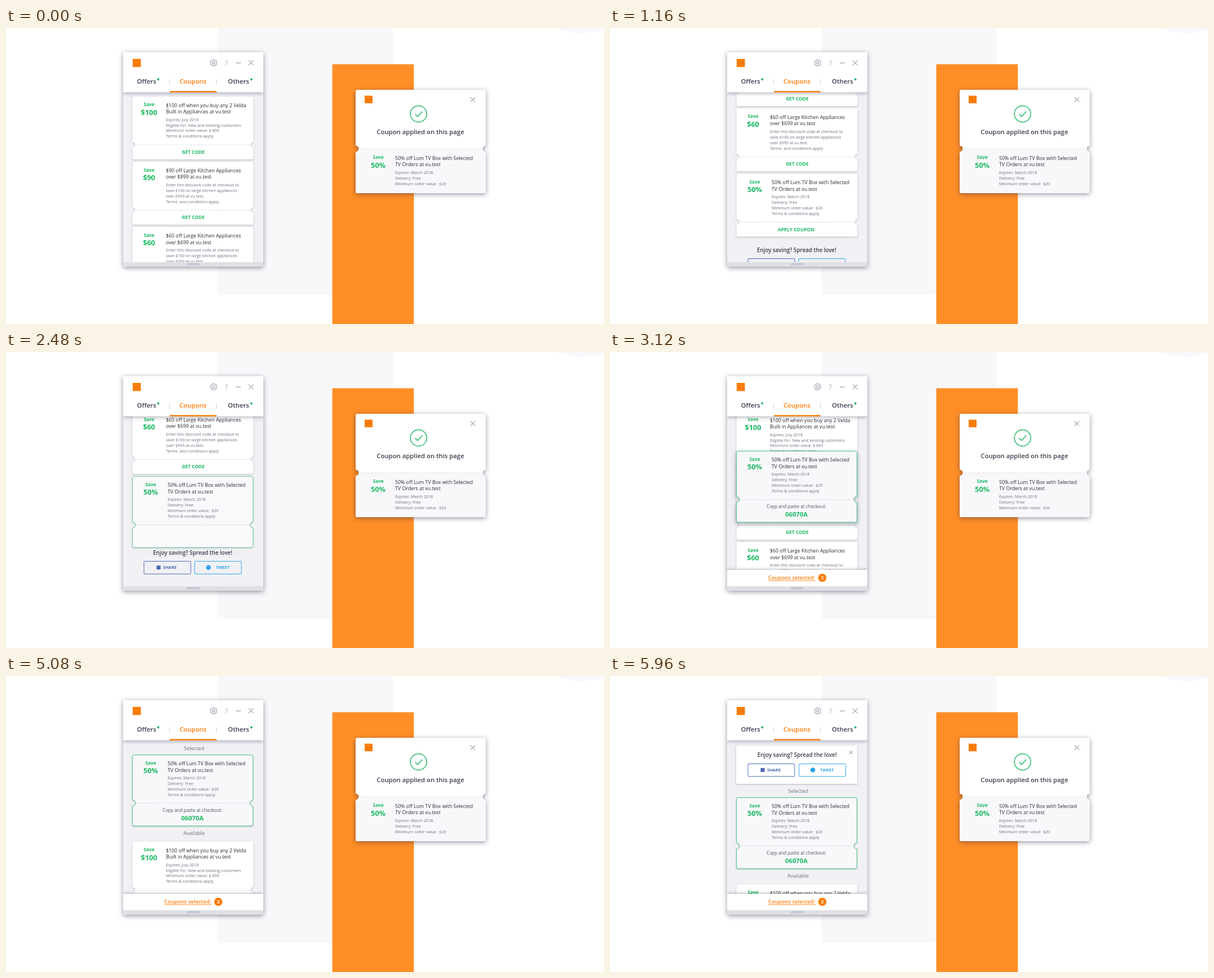
Animation of 1062 by 527 pixels, one loop 8040 ms. Source, as an HTML page with a canvas:

```html
<!DOCTYPE html>
<html lang="en">
<head>
<meta charset="utf-8">
<title>Coupon panel</title>
<style>
  html, body { margin: 0; width: 100%; height: 100%; overflow: hidden; background: #fff; }
  canvas { display: block; width: 1062px; height: 527px; }
</style>
</head>
<body>
<canvas id="stage"></canvas>
<script>
const W = 1062, H = 527, LOOP = 8040, STEP = 40;
const canvas = document.getElementById('stage');
const ctx = canvas.getContext('2d');
const dpr = window.devicePixelRatio || 1;
canvas.width = W * dpr;
canvas.height = H * dpr;

const GREEN = '#1cba63', ORANGE = '#f97c08', INK = '#3a3c4c', TITLE = '#2a2b35',
      MUTED = '#6c6f80', ICON = '#b3b4c0', LIST = '#f1f1f5', TINT = '#f8f8fb';
const CARD_X = 224.5, CARD_W = 215, CARD_H = 112, NOTCH = 86, PITCH = 116.3, LIST_TOP = 122;
const SCROLL = 249.3, RETURN = 422, CARD_RISE = 81.4, PANEL_DROP = 76.3;

const coupons = [
  { save: '$100', title: ['$100 off when you buy any 2 Velda', 'Built in Appliances at vu.test'],
    info: ['Expires; July 2018', 'Eligible for: New and existing customers', 'Minimum order value: $ 800', 'Terms & conditions apply'] },
  { save: '$90', title: ['$90 off Large Kitchen Appliances', 'over $899 at vu.test'],
    info: ['Enter this discount code at checkout to', 'save £100 on large kitchen appliances', 'over £999 at vu.test.', 'Terms  and conditions apply'] },
  { save: '$60', title: ['$60 off Large Kitchen Appliances', 'over $699 at vu.test'],
    info: ['Enter this discount code at checkout to', 'save $100 on large kitchen appliances', 'over $999 at vu.test.', 'Terms  and conditions apply'] }
];
const tvCoupon = { save: '50%', title: ['50% off Lum TV Box with Selected', 'TV Orders at vu.test'],
  info: ['Expires: March 2018', 'Delivery: Free', 'Minimum order value:  $20', 'Terms & conditions apply'] };

const ramp = (t, a, b) => Math.min(1, Math.max(0, (t - a) / (b - a)));
const ease = (t, a, b) => {
  const p = ramp(t, a, b);
  return p < 0.5 ? 2 * p * p : 1 - 2 * (1 - p) * (1 - p);
};

function rect(x, y, w, h, color) {
  ctx.fillStyle = color;
  ctx.fillRect(x, y, w, h);
}

function disc(x, y, r, color) {
  ctx.fillStyle = color;
  ctx.beginPath();
  ctx.arc(x, y, r, 0, Math.PI * 2);
  ctx.fill();
}

// y is the middle of the capital letters
function text(str, x, y, size, color, weight = 400, align = 'left') {
  ctx.font = `${weight} ${size}px "Open Sans", sans-serif`;
  ctx.fillStyle = color;
  ctx.textAlign = align;
  ctx.fillText(str, x, y + size * 0.35);
}

function line(color, width, ...points) {
  ctx.strokeStyle = color;
  ctx.lineWidth = width;
  ctx.beginPath();
  points.forEach(([x, y]) => ctx.lineTo(x, y));
  ctx.stroke();
}

function cross(x, y, r) {
  line(ICON, 1.5, [x - r, y - r], [x + r, y + r]);
  line(ICON, 1.5, [x - r, y + r], [x + r, y - r]);
}

function withAlpha(alpha, draw) {
  if (alpha <= 0) return;
  ctx.save();
  ctx.globalAlpha *= alpha;
  draw();
  ctx.restore();
}

function withShadow(color, blur, dy, draw) {
  ctx.save();
  ctx.shadowColor = color;
  ctx.shadowBlur = blur * dpr;
  ctx.shadowOffsetY = dy * dpr;
  draw();
  ctx.restore();
}

function box(x, y, w, h, r) {
  ctx.beginPath();
  ctx.roundRect(x, y, w, h, r);
}

function ticketPath(x, y, w, h, notchY, r) {
  const c = 3, q = Math.PI / 2;
  ctx.beginPath();
  ctx.moveTo(x + c, y);
  ctx.arcTo(x + w, y, x + w, y + c, c);
  ctx.arc(x + w, y + notchY, r, -q, q, true);
  ctx.arcTo(x + w, y + h, x + w - c, y + h, c);
  ctx.arcTo(x, y + h, x, y + h - c, c);
  ctx.arc(x, y + notchY, r, q, -q, true);
  ctx.arcTo(x, y, x + c, y, c);
  ctx.closePath();
}

function perforation(x1, x2, y) {
  ctx.save();
  ctx.setLineDash([4, 2.4]);
  line('#dcdde4', 1.2, [x1, y], [x2, y]);
  ctx.restore();
}

function offer(c, labelX, textX, y, rows = 4) {
  text('Save', labelX, y + 14.3, 8.3, GREEN, 700, 'center');
  text(c.save, labelX, y + 28.3, 12.7, GREEN, 700, 'center');
  c.title.forEach((s, i) => text(s, textX, y + 15.5 + i * 11.5, 8.8, TITLE));
  c.info.slice(0, rows).forEach((s, i) => text(s, textX, y + 41.2 + i * 9.85, 7.2, MUTED));
}

function listCard(c, y) {
  if (y > 420 || y + CARD_H < 105) return;
  withShadow('rgba(40,42,70,.3)', 3, 1, () => {
    ticketPath(CARD_X, y, CARD_W, CARD_H, NOTCH, 5);
    ctx.fillStyle = '#fff';
    ctx.fill();
  });
  offer(c, 254, 284, y);
  perforation(231, 434, y + NOTCH);
  text('GET CODE', 332.5, y + 99, 8.4, GREEN, 700, 'center');
}

function shareButton(x, y, color, label, labelX, mark) {
  ctx.strokeStyle = color;
  ctx.lineWidth = 1;
  box(x, y, 83, 22.5, 1);
  ctx.stroke();
  mark(y + 11);
  text(label, labelX, y + 11, 7.5, color, 700);
}

function shareBlock(y, shift) {
  text('Enjoy saving? Spread the love!', 331.5 + shift, y, 9.8, INK, 600, 'center');
  shareButton(245, y + 15.3, '#4a68b4', 'SHARE', 279, my => rect(267.5, my - 3.5, 7, 7, '#4a68b4'));
  shareButton(335 + shift, y + 15.3, '#2ca7e8', 'TWEET', 372.5 + shift, my => disc(359.5 + shift, my, 4.3, '#2ca7e8'));
}

function tvCard(t, y) {
  const picked = ramp(t, 2000, 2600);
  const lift = ramp(t, 2480, 2800) * (1 - ramp(t, 3560, 3800));
  const h = CARD_H + 14.5 * ease(t, 2000, 2400);
  ticketPath(CARD_X, y, CARD_W - picked, h, NOTCH, 5 + picked * 0.5);
  withShadow(`rgba(40,42,70,${0.3 + 0.15 * lift})`, 3 + 6 * lift, 1 + 2 * lift, () => {
    ctx.fillStyle = '#fff';
    ctx.fill();
  });
  withAlpha(picked, () => {
    ctx.fillStyle = TINT;
    ctx.fill();
    ctx.strokeStyle = '#45c480';
    ctx.lineWidth = 1;
    ctx.stroke();
  });
  offer(tvCoupon, 257, 287, y);
  perforation(231, 433, y + NOTCH);
  withAlpha(1 - ramp(t, 2000, 2280), () =>
    text('APPLY COUPON', 330.5, y + 99.3, 8.4, GREEN, 700, 'center'));
  withAlpha(ramp(t, 2480, 2800), () => {
    text('Copy and paste at checkout:', 331, y + 98.4, 8.1, '#4f5263', 400, 'center');
    text('06070A', 331, y + 112.2, 11.3, GREEN, 700, 'center');
  });
}

function sharePanel(y) {
  withShadow('rgba(40,42,70,.3)', 3, 1, () => rect(224, y, 215, 68, '#fff'));
  shareBlock(y + 17, 0.7);
  cross(428, y + 12, 3);
}

function selectedBar(t) {
  const y = 417 - 29 * ease(t, 2480, 2800);
  if (y >= 417) return;
  withShadow('rgba(40,42,70,.35)', 5, -1, () => rect(208, y, 249, 30, '#fff'));
  text('Coupons selected:', 281, y + 14, 9.5, ORANGE, 600);
  rect(281, y + 18.6, 84, 0.9, ORANGE);
  disc(377, y + 14, 7.3, ORANGE);
  text(t < 2960 ? '1' : '2', 377, y + 14, 8, '#fff', 700, 'center');
}

function list(t) {
  const back = ease(t, 2500, 3676), open = ease(t, 5040, 5960);
  const drop = PANEL_DROP * open;
  const offset = -SCROLL * ease(t, 320, 1480) + RETURN * back + drop;

  ctx.save();
  ctx.beginPath();
  ctx.rect(208, 114, 249, 303);
  ctx.clip();
  rect(208, 114, 249, 303, LIST);
  coupons.forEach((c, i) => listCard(c, LIST_TOP + i * PITCH + offset));
  shareBlock(606.7 + offset, 0);
  tvCard(t, LIST_TOP + 3 * PITCH + offset - (RETURN + CARD_RISE) * back);
  withAlpha(ramp(t, 3640, 4040), () => {
    text('Selected', 334, 128.7 + drop, 9.2, MUTED, 400, 'center');
    text('Available', 334, 279.7 + drop, 9.1, MUTED, 400, 'center');
  });
  if (open > 0) sharePanel(124 - 80 * (1 - open));
  selectedBar(t);
  ctx.restore();
}

function header() {
  withShadow('rgba(40,42,70,.4)', 7, 1, () => {
    ctx.save();
    ctx.beginPath();
    ctx.rect(208, 43, 249, 84);
    ctx.clip();
    rect(208, 43, 249, 71.5, '#fff');
    ctx.restore();
  });
  rect(225, 55, 14.5, 14.5, ORANGE);

  ctx.strokeStyle = ICON;
  ctx.lineWidth = 1.5;
  ctx.beginPath();
  for (let i = 0; i < 6; i++) {
    const a = Math.PI / 6 + i * Math.PI / 3;
    ctx.lineTo(368.7 + 6 * Math.cos(a), 62 + 6 * Math.sin(a));
  }
  ctx.closePath();
  ctx.stroke();
  ctx.beginPath();
  ctx.arc(368.7, 62, 2.1, 0, Math.PI * 2);
  ctx.stroke();
  text('?', 391.3, 62, 13, '#a5a6b3', 400, 'center');
  line(ICON, 1.6, [408, 62.3], [417, 62.3]);
  cross(435.3, 62, 4.3);

  text('Offers', 232.5, 95.2, 11.4, INK, 600);
  text('Coupons', 332, 95.2, 11.4, ORANGE, 600, 'center');
  text('Others', 394, 95.2, 11.4, INK, 600);
  disc(270.3, 91.6, 2, GREEN);
  disc(435.8, 91.6, 2, GREEN);
  line('#cfd0d8', 1, [290.5, 91], [290.5, 101]);
  line('#cfd0d8', 1, [373.5, 91], [373.5, 101]);
  rect(291, 112.2, 83, 2.4, ORANGE);
}

function panel(t) {
  withShadow('rgba(40,42,75,.5)', 9, 2, () => {
    box(208, 43, 249, 382, 2);
    ctx.fillStyle = '#fff';
    ctx.fill();
  });
  list(t);
  header();
  rect(208, 417, 249, 8, '#dfe0e6');
  line('#a9abb7', 0.9, [321, 419.5], [343.5, 419.5]);
  line('#a9abb7', 0.9, [321, 421.8], [343.5, 421.8]);
}

function popup() {
  ticketPath(621, 110, 231, 184, 105, 5.5);
  withShadow('rgba(40,42,75,.5)', 9, 2, () => {
    ctx.fillStyle = '#fff';
    ctx.fill();
  });
  ctx.save();
  ctx.clip();
  rect(621, 215, 231, 80, TINT);
  ctx.restore();
  perforation(628, 847, 215);
  rect(637, 120.5, 14, 13.5, ORANGE);
  cross(829, 127.5, 4.3);
  ctx.strokeStyle = '#28bb6b';
  ctx.lineWidth = 1.5;
  ctx.beginPath();
  ctx.arc(732.7, 153, 14.6, 0, Math.PI * 2);
  ctx.stroke();
  line('#28bb6b', 1.6, [726.5, 153.3], [730.8, 157.5], [739.3, 148.7]);
  text('Coupon applied on this page', 736, 184.7, 11.3, INK, 600, 'center');
  offer(tvCoupon, 661, 691, 216.2, 3);
}

function render(t) {
  ctx.setTransform(dpr, 0, 0, dpr, 0, 0);
  rect(0, 0, W, H, '#fff');
  rect(376, 0, 311, 475, '#f8f8fa');
  disc(1022, -108, 117, '#f8f8fc');
  rect(579.5, 64.5, 144.8, 463, '#ff8e26');
  panel(t);
  popup();
}

const start = performance.now();
function tick() {
  const t = (performance.now() - start) % LOOP;
  render(Math.floor(t / STEP) * STEP);
  requestAnimationFrame(tick);
}
tick();
</script>
</body>
</html>
```
